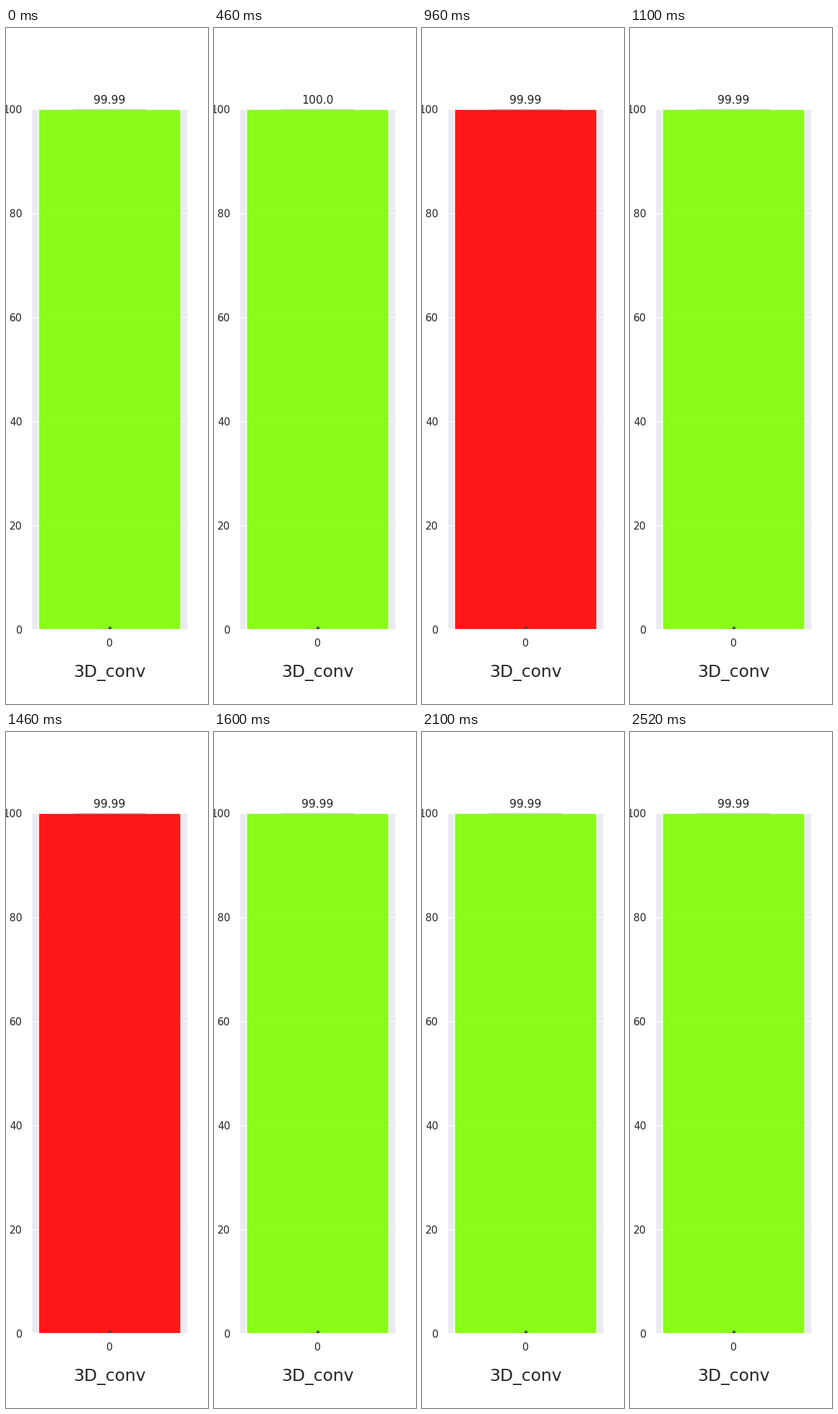
A matplotlib script that plays this animation: 300x1000 px, repeating every 2560 ms.

```python
import matplotlib.pyplot as plt
from matplotlib.animation import FuncAnimation
from matplotlib.patches import Rectangle

STEP = 20      # ms per tick
TICKS = 128
GREEN, RED = "#7fff00", "#ff0000"

# Half-open time spans in ms; the second half of the loop mirrors the first.
RED_SPANS = [(40, 140), (800, 940), (960, 980), (1040, 1100)]
FULL_SPANS = [(460, 500), (580, 640)]

plt.rcParams.update({
    "font.family": "DejaVu Sans",
    "text.color": ".15",
    "axes.labelcolor": ".15",
    "axes.facecolor": "#eaeaf2",
    "axes.edgecolor": "white",
    "axes.linewidth": 1.25,
    "axes.axisbelow": True,
    "axes.titlesize": 12,
    "grid.color": "white",
    "grid.linewidth": 1,
})

fig = plt.figure(figsize=(3, 10), dpi=100, facecolor="white")
ax = fig.add_axes([0.125, 0.11, 0.775, 0.77])
ax.set(xlim=(-0.44, 0.44), ylim=(0, 100), xticks=[0], yticks=range(0, 101, 20))
ax.grid(axis="y")
ax.tick_params(length=0, pad=9.5, labelsize=11, labelcolor=".15")

bar = ax.bar(0, 100, width=0.8, color=GREEN, edgecolor="white",
             linewidth=1, alpha=0.9)[0]
ax.plot(0, 0, "d", ms=5, mew=1, color="#444444")
title = ax.set_title("99.99")
fig.text(153.75 / 300, 0.04, "3D_conv", size=18, ha="center", va="baseline")

# whisker cap peeking out at the top edge
fig.add_artist(Rectangle((100 / 300, 0.879), 108 / 300, 0.001,
                         transform=fig.transFigure, color="#c4c6ca",
                         linewidth=0, zorder=5))


def within(t, spans):
    return any(a <= t < b for a, b in spans)


def update(i):
    t = min(i, TICKS - 1 - i) * STEP
    bar.set_facecolor(RED if within(t, RED_SPANS) else GREEN)
    title.set_text("100.0" if within(t, FULL_SPANS) else "99.99")
    return bar, title


anim = FuncAnimation(fig, update, frames=TICKS, interval=STEP,
                     repeat=True, repeat_delay=0, blit=False)
plt.show()
```
